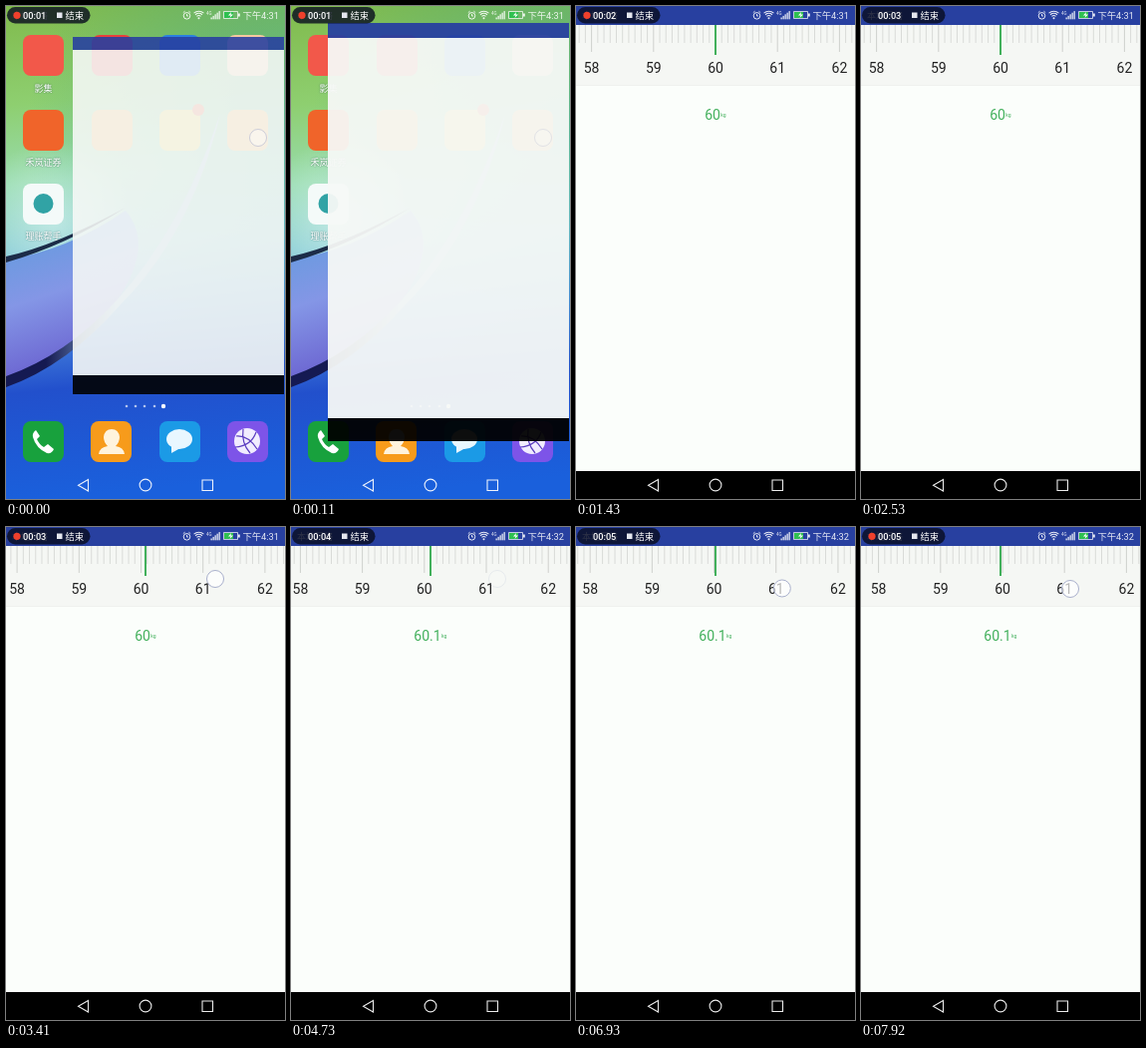
Animation, 280 px wide and 494 px high, one loop 8000 ms. Source, as an HTML page with a canvas:

```html
<!DOCTYPE html>
<html lang="zh">
<head>
<meta charset="utf-8">
<title>Ruler picker</title>
<style>
html, body { margin: 0; width: 100%; height: 100%; overflow: hidden; background: #000; }
canvas { display: block; width: 280px; height: 494px; }
</style>
</head>
<body>
<canvas id="stage" width="280" height="494"></canvas>
<script>
const W = 280, H = 494, LOOP = 8000, STEP = 110, OPEN = 440, SECOND = 1900;
const FONT = 'Roboto, "Noto Sans CJK SC", "Noto Sans CJK", sans-serif';
const GREEN = '#43b05c', BAR = '#2840a0';
const c = document.getElementById('stage').getContext('2d');

// [time, value] keys, joined by straight moves
const RULER_X = [[2750, 0], [3410, -4.5], [4290, -7.5], [4510, -6.2], [5500, -6.2], [6050, -4.5], [7920, 2]];
const TOUCHES = [
  { from: 2750, up: 4400, x: [[2750, 214.5], [3410, 210], [4290, 207]], y: [[2750, 52]] },
  { from: 5500, up: 9000, x: [[5500, 202], [6050, 204], [7920, 210]], y: [[5500, 61], [6050, 61], [7920, 62]] }
];

function along(keys, t) {
  if (t <= keys[0][0]) return keys[0][1];
  for (let i = 1; i < keys.length; i++) {
    const [t0, a] = keys[i - 1], [t1, b] = keys[i];
    if (t <= t1) return a + (b - a) * (t - t0) / (t1 - t0);
  }
  return keys[keys.length - 1][1];
}

const mix = (a, b, k) => a + (b - a) * k;

function rect(x, y, w, h, color) {
  c.fillStyle = color;
  c.fillRect(x, y, w, h);
}

function tile(x, y, w, h, r, color) {
  c.fillStyle = color;
  c.beginPath();
  c.roundRect(x, y, w, h, r);
  c.fill();
}

function disc(x, y, r, color) {
  c.fillStyle = color;
  c.beginPath();
  c.arc(x, y, r, 0, 7);
  c.fill();
}

function shape(d, stroke, width, fill) {
  const p = new Path2D(d);
  if (fill) { c.fillStyle = fill; c.fill(p); }
  if (stroke) { c.strokeStyle = stroke; c.lineWidth = width; c.stroke(p); }
}

function text(s, x, y, size, color, align = 'left', weight = 400) {
  c.font = `${weight} ${size}px ${FONT}`;
  c.textAlign = align;
  c.fillStyle = color;
  c.fillText(s, x, y);
}

function withStops(g, stops) {
  stops.forEach(([k, color]) => g.addColorStop(k, color));
  return g;
}

const linear = (x0, y0, x1, y1, stops) => withStops(c.createLinearGradient(x0, y0, x1, y1), stops);
const radial = (x, y, r, stops) => withStops(c.createRadialGradient(x, y, 0, x, y, r), stops);

function wallpaper() {
  rect(0, 0, W, H, linear(0, 0, 50, H, [
    [0, '#80ba4c'], [.2, '#8ecf70'], [.36, '#98dcb0'], [.5, '#86cbd6'],
    [.64, '#4f8fe0'], [.78, '#2250cc'], [1, '#1a60dc']]));
  rect(0, 0, W, H, radial(280, 130, 260, [[0, 'rgba(40,150,150,.5)'], [1, 'rgba(40,150,150,0)']]));
  rect(0, 120, 140, 190, radial(48, 215, 80, [[0, 'rgba(225,248,245,.6)'], [1, 'rgba(225,248,245,0)']]));
  shape('M0 254 Q60 246 120 205 Q150 240 110 297 Q60 352 0 374 Z', null, 0,
    linear(0, 250, 40, 370, [[0, '#6c9ae0'], [.4, '#8496e6'], [1, '#6a62d0']]));
  shape('M0 251 Q50 240 120 202 Q60 240 0 257 Z', null, 0, '#1c2c48');
  shape('M0 371 Q60 350 110 296 Q175 225 215 108 Q185 230 115 299 Q62 360 0 382 Z', null, 0,
    linear(40, 0, 110, 0, [[0, '#151a52'], [1, '#8fb4dc']]));
}

function dock() {
  [[17, '#18a13d'], [85, '#f79b1b'], [154, '#1b9ae6'], [222, '#7d54e8']]
    .forEach(([x, color]) => tile(x, 416, 41, 41, 8, color));
  shape('M30 425 q-4 3 -3 7 q3 11 14 16 q5 1 7 -4 l-6 -5 l-4 3 q-5 -3 -7 -8 l3 -3 Z', null, 0, '#fff');
  shape('M93 449 q1 -7 9 -8 q-4 -4 -4 -9 q1 -8 8 -8 q7 0 8 8 q0 5 -4 9 q8 1 9 8 Z', null, 0, '#fff3dc');
  c.fillStyle = '#e8f7ff';
  c.beginPath();
  c.ellipse(174, 434, 13, 10, 0, 0, 7);
  c.fill();
  shape('M166 440 L166 448 L175 443 Z', null, 0, '#e8f7ff');
  disc(242, 436, 13, '#f1ecff');
  shape('M231 431 Q243 430 252 444 M238 424 Q236 438 245 448 M230 442 Q246 441 251 427', '#5a3cc0', 1.2);
  [[121, 1.3], [130, 1.3], [139, 1.3], [149, 1.3], [158, 2.2]]
    .forEach(([x, r]) => disc(x, 401, r, r > 2 ? '#fff' : 'rgba(255,255,255,.65)'));
}

function home() {
  wallpaper();
  tile(17, 29, 41, 41, 8, '#f2584a');
  tile(17, 104, 41, 41, 8, '#f0642a');
  tile(17, 178, 41, 41, 8, '#f4faf9');
  disc(37.5, 198, 10, '#31a3a5');
  c.shadowColor = 'rgba(0,40,40,.6)';
  c.shadowBlur = 2;
  ['影集', '禾岚证券', '理账帮手'].forEach((s, i) => text(s, 37.5, 86 + i * 74, 9, '#fff', 'center'));
  c.shadowBlur = 0;
  ['#e8403c', '#2b7fe0', '#f5c9a0', '#f5a03c', '#f0c840', '#f5a840']
    .forEach((color, i) => tile(86 + i % 3 * 68, 29 + (i > 2) * 75, 41, 41, 8, color));
  disc(193, 104, 6, '#f0502c');
  dock();
}

function navIcons() {
  const line = 'rgba(255,255,255,.92)';
  shape('M82.5 474.5 L72.5 480.3 L82.5 486 Z', line, 1.1);
  shape('M197 475 h10.5 v10.5 h-10.5 Z', line, 1.1);
  c.beginPath();
  c.arc(140, 480, 5.9, 0, 7);
  c.stroke();
}

function launchWindow(t) {
  const k = 1 - Math.pow(1 - t / OPEN, 2.07);
  const edge = (a, b) => Math.round(mix(a, b, k));
  const x = edge(67, 0), y = edge(31, 0), w = edge(279, W - .9) - x, b = edge(389, H);
  const top = Math.round(y + (b - y) * .0365), foot = Math.round(b - (b - y) * .054);
  c.globalAlpha = Math.min(1, .89 + t / 2000);
  rect(x, y, w, top - y, BAR);
  rect(x, top, w, foot - top, '#f7f9f7');
  rect(x, foot, w, b - foot, '#000');
  c.globalAlpha = 1;
}

function ruler(t) {
  const zero = 140 + along(RULER_X, t), unit = 62.2;
  rect(0, 19, W, 61, '#f5f7f4');
  rect(0, 79, W, 1, '#eff1ee');
  for (let n = -25; n <= 25; n++) {
    const x = zero + n * unit / 10;
    rect(x - .5, 19, 1, n % 10 ? 18 : 27, n % 10 ? '#d9dbd8' : '#cfd1ce');
  }
  for (let n = -3; n <= 3; n++) text(60 + n, zero + n * unit, 67, 14, '#222', 'center');
  rect(139, 19, 2, 30, GREEN);
}

function reading(t) {
  const value = t < 4400 ? '60' : '60.1';
  c.font = `14px ${FONT}`;
  const w = c.measureText(value).width, x = 140 - (w + 6) / 2;
  text(value, x, 114, 14, GREEN);
  text('kg', x + w + .4, 111, 5, GREEN);
}

function touchRing(x, y, alpha) {
  c.globalAlpha = alpha;
  disc(x, y, 8.5, 'rgba(255,255,255,.68)');
  c.strokeStyle = '#a9b0cc';
  c.lineWidth = 1;
  c.stroke();
  c.globalAlpha = 1;
}

function app(t) {
  rect(0, 0, W, H, '#fbfefb');
  rect(0, 0, W, 19, BAR);
  rect(0, 466, W, 28, '#000');
  ruler(t);
  reading(t);
  for (const f of TOUCHES) {
    const alpha = t < f.from ? 0 : Math.min(1, Math.max(0, 1 - (t - f.up) / 410));
    if (alpha) touchRing(along(f.x, t), along(f.y, t), alpha);
  }
}

// The dot blinks: off for the first half of each recorded second
function recorder(t) {
  const seconds = 1 + (t - 350 + SECOND) / SECOND;
  text('本地网络', 6, 13, 9, 'rgba(255,255,255,.75)');
  tile(1, 1, 83.5, 16.5, 8.2, 'rgba(8,12,30,.8)');
  if (seconds % 1 >= .5) disc(11, 9.3, 3.6, '#f0402c');
  text('00:0' + Math.floor(seconds), 17, 13, 9.2, '#fff', 'left', 500);
  rect(51, 6.5, 5.5, 5.5, '#e4e6ee');
  text('结束', 59.5, 13, 9.3, '#fff');
}

function statusIcons(t) {
  const white = 'rgba(255,255,255,.88)';
  c.strokeStyle = white;
  c.lineWidth = 1;
  c.beginPath();
  c.arc(181.5, 9.8, 3.3, 0, 7);
  c.stroke();
  shape('M181.5 7.8 V10 H183 M177.8 6.6 L179.6 5.2 M183.4 5.2 L185.2 6.6', white, .9);
  c.lineWidth = 1.1;
  for (const r of [3, 5.2, 7.4]) {
    c.beginPath();
    c.arc(193.5, 12.6, r, -2.3, -.84);
    c.stroke();
  }
  disc(193.5, 12.2, 1, white);
  text('4G', 201, 8.5, 4.5, white);
  for (let i = 0; i < 5; i++) rect(205.5 + i * 2, 11.5 - i * 1.6, 1.3, 1.8 + i * 1.6, white);
  shape('M218.5 5.5 h14 v7 h-14 Z', 'rgba(255,255,255,.7)', 1);
  rect(233, 7.5, 1.8, 3, white);
  rect(219, 6, 9, 6, '#2fc050');
  shape('M226 6 L223 9.5 H225.5 L224.5 12 L228 8.5 H225.5 Z', null, 0, '#fff');
  text('下午' + (t < 4180 ? '4:31' : '4:32'), 274, 13, 9.3, white, 'right');
}

function draw(t) {
  c.clearRect(0, 0, W, H);
  if (t < OPEN) {
    home();
    launchWindow(t);
    if (t < 220) touchRing(253, 132, .55 - t / 400);
  } else {
    app(t);
  }
  recorder(t);
  statusIcons(t);
  navIcons();
}

function frame() {
  const t = performance.now() % LOOP;
  draw(Math.floor(t / STEP) * STEP);
  requestAnimationFrame(frame);
}
frame();
</script>
</body>
</html>
```
